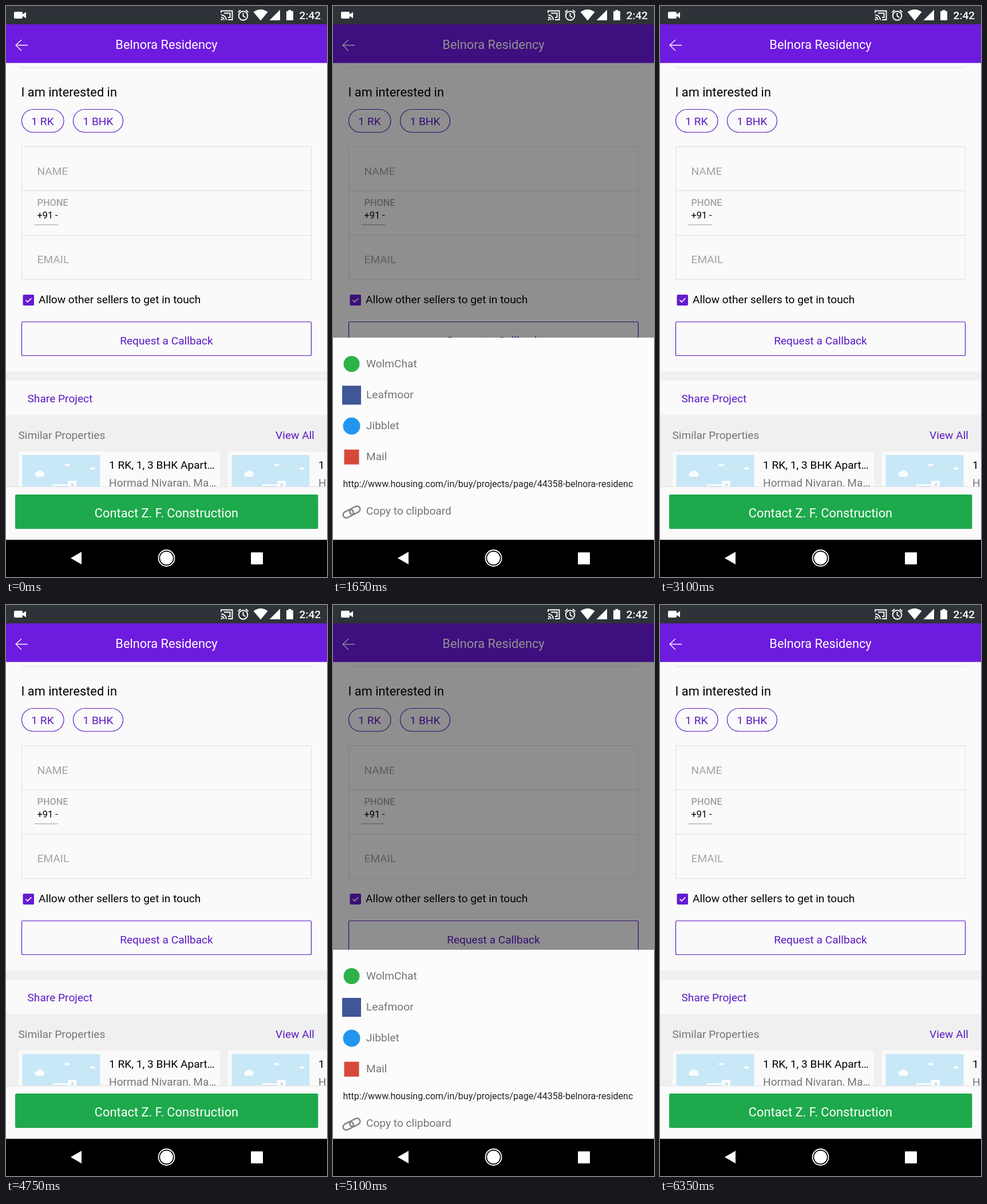
An HTML page that plays this animation: 561 by 997 pixels, repeating every 6400 ms.

```html
<!DOCTYPE html>
<html lang="en">
<head>
<meta charset="utf-8">
<title>Share sheet</title>
<style>
  html, body { margin: 0; width: 100%; height: 100%; overflow: hidden; background: #000; }
  svg { display: block; width: 100%; height: 100%; }
  text { font-family: Roboto, "Noto Sans", sans-serif; font-size: 19.15px; }
  .large { font-size: 21.8px; }
  .small { font-size: 16.3px; }
  .mid { text-anchor: middle; }
  .purple { fill: #5b1ac4; }
  .hint { fill: #a3a3a3; }
  .grey { fill: #757575; }
  .white { fill: #fff; }
  .outline { fill: none; stroke: #5b1ac4; stroke-width: 1.2; }
  .rule { fill: none; stroke: #dedede; }
</style>
</head>
<body>
<svg viewBox="0 0 561 997">
  <defs>
    <g id="card">
      <rect width="352" height="90" rx="2" fill="#fafafa"/>
      <rect x="6.5" y="6" width="136" height="84" fill="#c8e7f7"/>
      <g fill="#f8fcfe">
        <path d="M33 44a4 4 0 0 1-1-8 6 6 0 0 1 10-1 5 5 0 0 1 1 9z"/>
        <ellipse cx="85" cy="23.5" rx="4.5" ry="2.2"/>
        <ellipse cx="129" cy="29.5" rx="4.5" ry="2.2"/>
        <path d="M86 51h15v15H60v-9h26z"/>
      </g>
      <path d="M92 56h4v4h-4zM62 60h24v1H62z" fill="#c5dce8"/>
    </g>
  </defs>

  <rect width="561" height="997" fill="#fafafa"/>

  <!-- Page -->
  <path class="rule" d="M27 107.5H534M27.5 245.5H533.5V477.5H27.5ZM27 322.5H534M27 400.5H534"/>
  <text class="large" x="26.5" y="158">I am interested in</text>
  <rect class="outline" x="27.5" y="180.5" width="73.5" height="40" rx="20"/>
  <rect class="outline" x="117.5" y="180.5" width="87" height="40" rx="20"/>
  <text class="purple mid" x="64" y="208">1 RK</text>
  <text class="purple mid" x="161" y="208">1 BHK</text>
  <text class="hint" x="54.5" y="294.5">NAME</text>
  <text class="hint small" x="54.5" y="349" font-weight="500">PHONE</text>
  <text class="small" x="54.5" y="371">+91 -</text>
  <path d="M50 382H91" stroke="#333" stroke-dasharray="1.3 1.3"/>
  <text class="hint" x="54.5" y="449">EMAIL</text>
  <rect x="29.500" y="504" width="19.500" height="19" rx="2" fill="#651ad2"/>
  <path d="M34.500 513.500l3.300 3.300 6.500-6.500" fill="none" stroke="#fff" stroke-width="1.700"/>
  <text x="57" y="519">Allow other sellers to get in touch</text>
  <rect class="outline" x="27.500" y="551.500" width="506" height="59" rx="2"/>
  <text class="purple mid" x="280.500" y="591">Request a Callback</text>
  <path d="M0 638H561V654H0ZM0 714H561V850H0Z" fill="#f0f0f0"/>
  <text class="purple" x="37.500" y="691.500">Share Project</text>
  <text class="grey" x="21.500" y="756">Similar Properties</text>
  <text class="purple" x="539" y="756" text-anchor="end">View All</text>
  <use href="#card" x="22" y="778"/>
  <use href="#card" x="388" y="778"/>
  <text x="180" y="808">1 RK, 1, 3 BHK Apart…</text>
  <text class="grey" x="180" y="839">Hormad Nivaran, Ma…</text>
  <text x="546" y="808">1 RK</text>
  <text class="grey" x="546" y="839">Ha</text>
  <rect y="839" width="561" height="93" fill="#fafafa"/>
  <path d="M0 839.500H561" stroke="#e4e4e4"/>
  <rect x="16" y="853" width="529.500" height="60" rx="2" fill="#1ea94c"/>
  <text class="large white mid" x="280.500" y="892.500">Contact Z. F. Construction</text>

  <!-- Title bar -->
  <rect y="32" width="561" height="67.500" fill="#6d1bdf"/>
  <path d="M38 68.500H17M27 59L17 68.500 27 78" fill="none" stroke="#fff" stroke-width="1.300"/>
  <text class="large white mid" x="280.500" y="75">Belnora Residency</text>

  <rect id="scrim" y="32" width="561" height="900" opacity="0"/>

  <!-- Share sheet -->
  <g id="sheet" transform="translate(0 932)">
    <rect width="561" height="353" fill="#fcfcfc"/>
    <circle cx="32.500" cy="46" r="14" fill="#2fb14a"/>
    <rect x="16" y="84" width="33" height="33" fill="#3f5796"/>
    <circle cx="32.500" cy="154.500" r="15" fill="#2196f0"/>
    <rect x="19.500" y="195.500" width="26" height="26" fill="#d6493a"/>
    <g class="grey">
      <text x="58" y="51.500">WolmChat</text>
      <text x="58" y="105.500">Leafmoor</text>
      <text x="58" y="160">Jibblet</text>
      <text x="58" y="214">Mail</text>
      <text x="58" y="309">Copy to clipboard</text>
    </g>
    <text x="17.500" y="261" style="font-size:16px" fill="#212121">http://www.housing.com/in/buy/projects/page/44358-belnora-residenc</text>
    <g fill="none" stroke="#858585" stroke-width="2.600" transform="translate(32.500 304.500) rotate(-27)">
      <rect x="-16" y="-5.500" width="19" height="11" rx="5.500"/>
      <rect x="-3" y="-5.500" width="19" height="11" rx="5.500"/>
    </g>
  </g>

  <!-- Status bar -->
  <rect width="561" height="32" fill="#2d3338"/>
  <g class="white">
    <path d="M16 10H27a2 2 0 0 1 2 2v2.500l6-4v11l-6-4V20a2 2 0 0 1-2 2H16a2 2 0 0 1-2-2V12a2 2 0 0 1 2-2z"/>
    <path d="M432.500 10.500Q445 1.500 457.500 10.500L445 25.500ZM479 6.500V25H460.500Z"/>
    <path d="M490 9h3.500V7h5v2H502V25H490z"/>
    <text x="512.500" y="23" font-weight="500">2:42</text>
  </g>
  <g fill="none" stroke="#fff" stroke-width="1.900">
    <path d="M376 12V8.500H395.500V24H388M376 15.500a9 9 0 0 1 9 9M376 19.500a5 5 0 0 1 5 5M381 12.500H391.500V20H388"/>
    <circle cx="414.500" cy="17" r="7.800"/>
    <path d="M414.500 12V17.500L418.500 20M405.500 11l4.500-4M423.500 11l-4.500-4"/>
  </g>
  <circle cx="377" cy="23.500" r="1.600" class="white"/>

  <!-- Navigation bar -->
  <rect y="932" width="561" height="65"/>
  <g class="white">
    <path d="M113 964L132 953V975Z"/>
    <circle cx="280.500" cy="964" r="11.300"/>
    <circle cx="280.500" cy="964" r="14" fill="none" stroke="#fff" stroke-width="1.800"/>
    <rect x="428" y="954" width="21" height="21" rx="1"/>
  </g>
</svg>
<script>
  const LOOP = 6400, STEP = 50;
  const FLOOR = 932, SHEET_HEIGHT = 353, SCRIM_ALPHA = 0.43;
  const visits = [
    { open: 296, close: 2745 },
    { open: 4893, close: 5695 }
  ];
  const sheet = document.getElementById('sheet');
  const scrim = document.getElementById('scrim');

  const progress = (t, start, duration) => Math.min(1, Math.max(0, (t - start) / duration));

  // Same curve as the CSS "ease" timing function.
  function ease(x) {
    const bezier = (u, a, b) => 3 * u * (1 - u) ** 2 * a + 3 * u * u * (1 - u) * b + u ** 3;
    let low = 0, high = 1;
    for (let i = 0; i < 20; i++) {
      const u = (low + high) / 2;
      if (bezier(u, 0.25, 0.25) < x) low = u; else high = u;
    }
    return bezier((low + high) / 2, 0.1, 1);
  }

  function render(time) {
    const t = Math.floor((time % LOOP) / STEP) * STEP;
    let shown = 0, dim = 0;
    for (const { open, close } of visits) {
      shown += ease(progress(t, open, 300)) - ease(progress(t, close, 330));
      dim += progress(t, open - 60, 120) - ease(progress(t, close, 330));
    }
    sheet.setAttribute('transform', `translate(0 ${FLOOR - Math.round(SHEET_HEIGHT * shown)})`);
    scrim.setAttribute('opacity', SCRIM_ALPHA * dim);
  }

  const start = performance.now();
  function tick() {
    render(performance.now() - start);
    requestAnimationFrame(tick);
  }
  tick();
</script>
</body>
</html>
```
